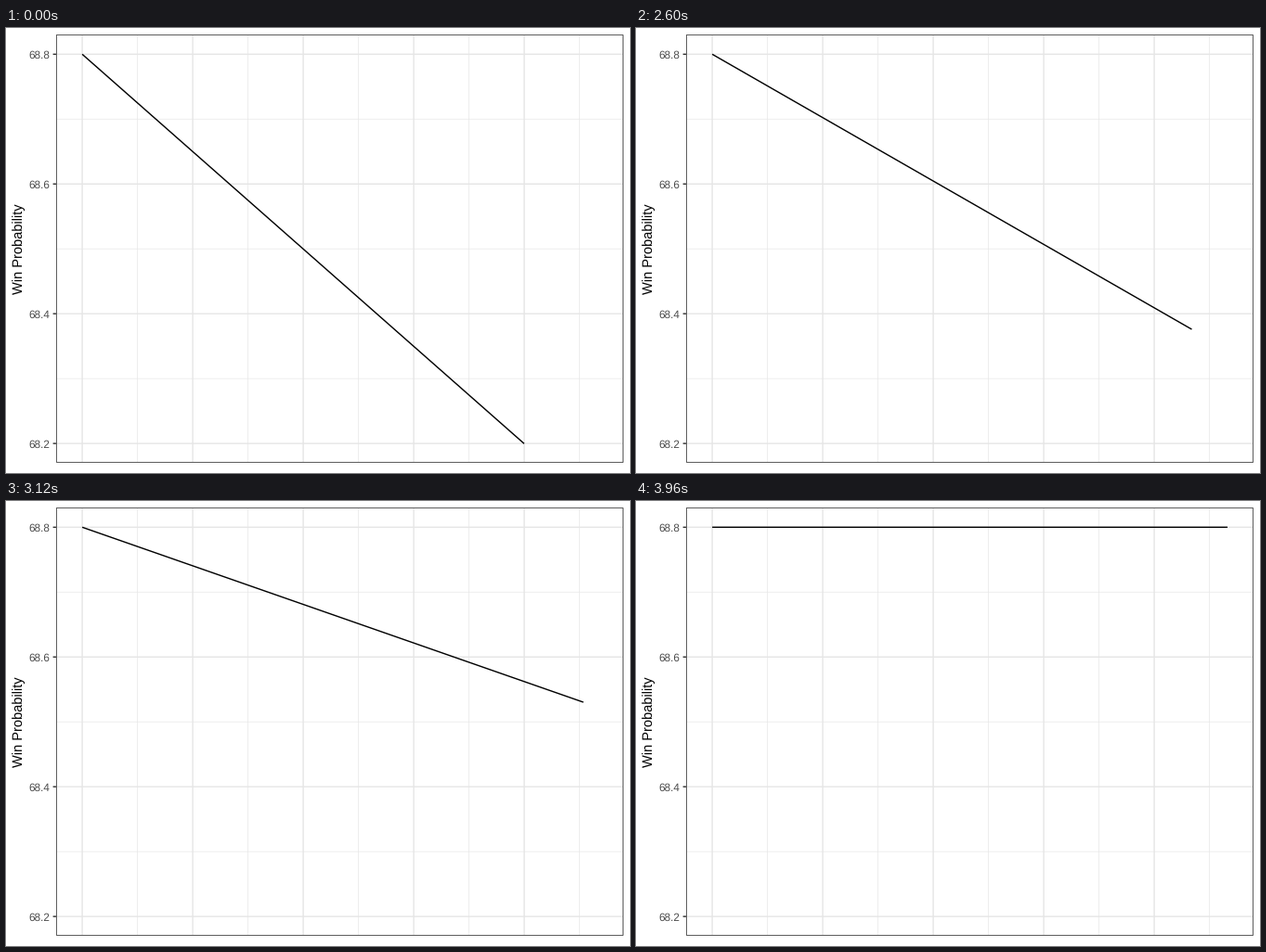
Write a matplotlib script that moves like this. It is 672 by 480 pixels and loops after 6000 ms.

```python
import matplotlib.pyplot as plt
from matplotlib.animation import FuncAnimation

W, H, DPI = 672, 480, 96
LEFT, RIGHT, TOP, BOTTOM = 54.5, 664.5, 7.5, 468.5
X0, X_STEP = 82.1, 119
Y_TOP, Y_STEP = 28.3, 139.95
HOLD, STEPS, FRAMES, INTERVAL = 50, 49, 150, 40

plt.rcParams["font.family"] = "Liberation Sans"
plt.rcParams["text.hinting"] = "none"


def px(width):
    """Pixels to points."""
    return width * 72 / DPI


fig = plt.figure(figsize=(W / DPI, H / DPI), dpi=DPI, facecolor="white")
ax = fig.add_axes([0, 0, 1, 1])
ax.set_xlim(0, W)
ax.set_ylim(H, 0)
ax.axis("off")


def stroke(xs, ys, color, width, z=1, cap="butt"):
    return ax.plot(xs, ys, color=color, lw=px(width), zorder=z,
                   solid_capstyle=cap, snap=False)[0]


def grid(xs, ys, color, width, z):
    for x in xs:
        stroke([x, x], [TOP, BOTTOM], color, width, z)
    for y in ys:
        stroke([LEFT, RIGHT], [y, y], color, width, z)


major_x = [X0 + X_STEP * i for i in range(5)]
major_y = [Y_TOP + Y_STEP * i for i in range(4)]
grid([x + X_STEP / 2 for x in major_x],
     [y + Y_STEP / 2 for y in major_y[:3]], "#e8e8e8", 0.75, 1)
grid(major_x, major_y, "#e6e6e6", 1.42, 2)

# Panel border, ticks and labels
stroke([LEFT, RIGHT, RIGHT, LEFT, LEFT], [TOP, TOP, BOTTOM, BOTTOM, TOP],
       "#5e5e5e", 1, 5, "projecting")
for i, y in enumerate(major_y):
    stroke([50.6, LEFT], [y, y], "#333333", 1.42, 4)
    ax.text(47.6, y + 4.4, f"{68.8 - 0.2 * i:.1f}", fontsize=8.8,
            color="#4d4d4d", ha="right", va="baseline")
ax.text(18, 238.3, "Win Probability", fontsize=11, color="black", rotation=90,
        rotation_mode="anchor", ha="center", va="baseline")

line = stroke([], [], "black", 1.42, 3)


def line_end(left):
    """End of the line with `left` steps to go until it is level."""
    s2 = left * left
    x = 637 - s2 * (0.0356 - 2.79e-6 * s2 + 6.95e-10 * s2 * s2)
    y = Y_TOP + left * (9.21 - 5.59e-4 * s2 + 1.221e-7 * s2 * s2)
    return x, y


def update(frame):
    step = min(max(frame - HOLD, 0), STEPS)
    x, y = line_end(STEPS - step)
    line.set_data([X0, x], [Y_TOP, y])
    return [line]


anim = FuncAnimation(fig, update, frames=FRAMES, interval=INTERVAL,
                     repeat=True, repeat_delay=0, blit=False)
plt.show()
```
